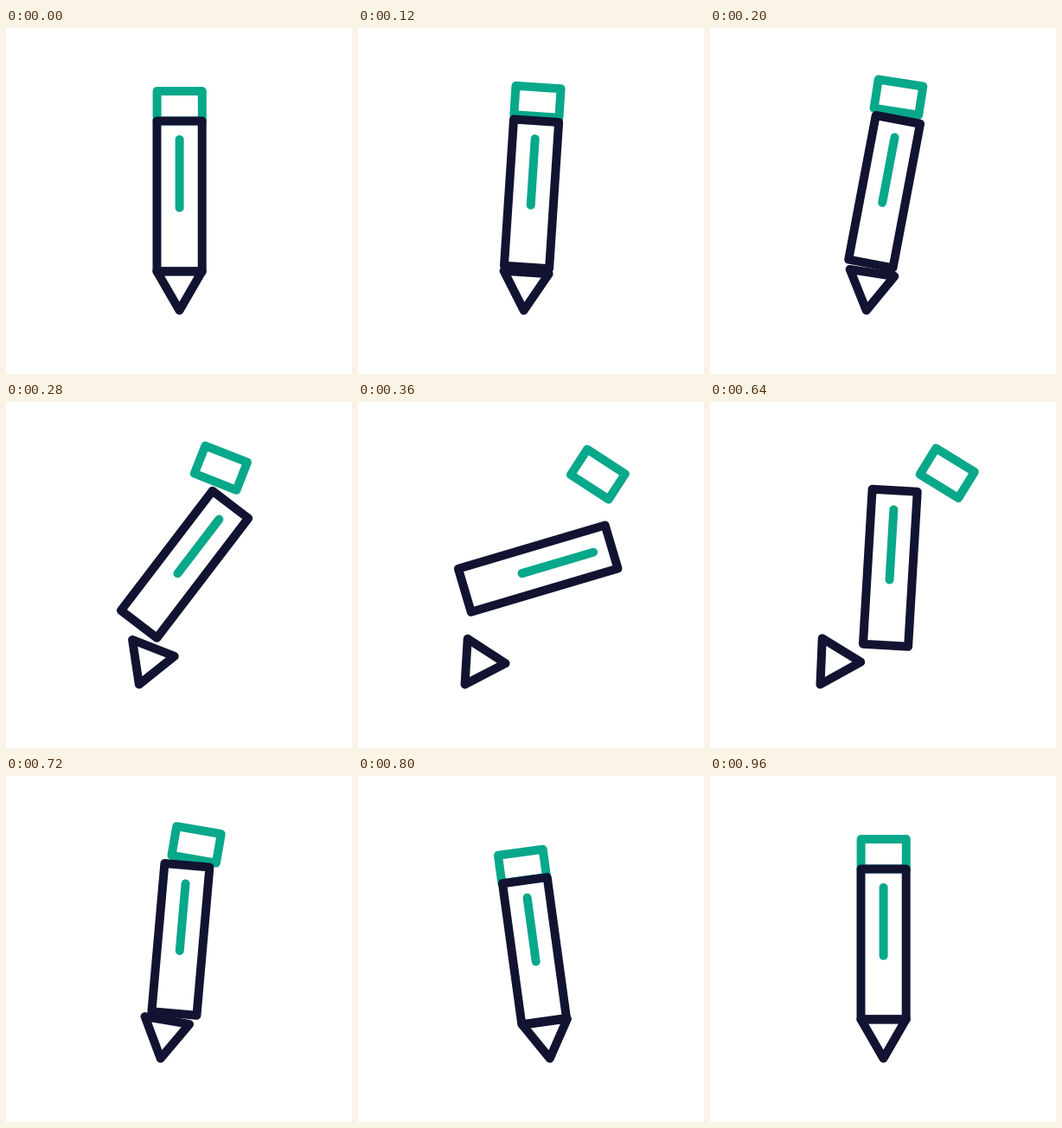
Write an HTML page that moves like this. It is 400 by 400 pixels and loops after 1.04 s.

```html
<!DOCTYPE html>
<html lang="en">
<head>
<meta charset="utf-8">
<title>Pencil</title>
<style>
  html, body { margin: 0; height: 100%; overflow: hidden; background: #fff; }
  svg { display: block; width: 100vw; height: 100vh; }
  path { fill: none; stroke: #121331; stroke-width: 10; stroke-linecap: round; stroke-linejoin: round; }
  .green { stroke: #08a88a; }
</style>
</head>
<body>
<svg viewBox="0 0 400 400">
  <path id="eraser" class="green"/>
  <path id="line" class="green"/>
  <path id="body"/>
  <path id="tip"/>
</svg>
<script>
const LOOP = 1040, STEP = 40;

// Smooth curve through [time, value] keys that never overshoots them
function track(keys) {
  const slope = i => (keys[i + 1][1] - keys[i][1]) / (keys[i + 1][0] - keys[i][0]);
  const tangent = i => {
    if (i === 0 || i === keys.length - 1) return 0;
    const a = slope(i - 1), b = slope(i);
    return a * b > 0 ? 2 * a * b / (a + b) : 0;
  };
  return t => {
    if (t <= keys[0][0]) return keys[0][1];
    const i = keys.findIndex(k => k[0] >= t) - 1;
    if (i < 0) return keys[keys.length - 1][1];
    const [t0, a] = keys[i], [t1, b] = keys[i + 1];
    const d = t1 - t0, u = (t - t0) / d, v = 1 - u;
    return a * v * v * (1 + 2 * u) + b * u * u * (3 - 2 * u)
      + d * u * v * (tangent(i) * v - tangent(i + 1) * u);
  };
}

const tilt = track([[0, 0], [200, 8.8], [360, 33], [480, 35.8], [520, 35.4],
  [600, 34.5], [640, 31.7], [800, -7.8], [960, 0]]);
const spin = track([[160, 0], [360, 40.5], [520, 287], [640, 331.7], [760, 360]]);
const stretch = track([[0, 1], [160, 0.97], [360, 1.017], [520, 1.003],
  [640, 1.03], [800, 0.945], [960, 1]]);

// Extra length of the inner line while the body spins
const growth = t => t > 320 && t < 640 ? 20 * (1 - Math.cos((t - 320) / 160 * Math.PI)) : 0;

const box = (w, h) => [[-w, -h], [w, -h], [w, h], [-w, h]];

function place(id, points, x, y, deg, squash, closed = true) {
  const a = deg * Math.PI / 180, c = Math.cos(a), s = Math.sin(a);
  const d = points.map(([px, py]) => {
    py *= squash;
    return (x + px * c - py * s).toFixed(2) + " " + (y + px * s + py * c).toFixed(2);
  }).join("L");
  document.getElementById(id).setAttribute("d", "M" + d + (closed ? "Z" : ""));
}

function draw(t) {
  const a = tilt(t), k = stretch(t), turn = a + spin(t);

  place("eraser", box(26.1, 17.25),
    200.7 + a * (1.68 + 0.036 * a - 0.0005 * a * a),
    90.3 + a * (0.0393 * a - 1.5), a, k);

  const x = 200.6 + a * (0.034 * a - 0.13 - 0.0007 * a * a);
  const y = 194.5 + a * (0.0225 * a - 0.8);
  place("body", box(26.1, 87), x, y, turn, k);
  place("line", [[0, -65.5], [0, 13.3 + growth(t)]], x, y, turn, k, false);

  // The point slides along the ground
  place("tip", [[-26.1, -45.2], [26.1, -45.2], [0, 0]],
    200.5 - a * (2.45 - 0.03 * a + 0.0008 * a * a), 326.5, a, k);
}

function frame() {
  draw(Math.floor(performance.now() % LOOP / STEP) * STEP);
  requestAnimationFrame(frame);
}
frame();
</script>
</body>
</html>
```
